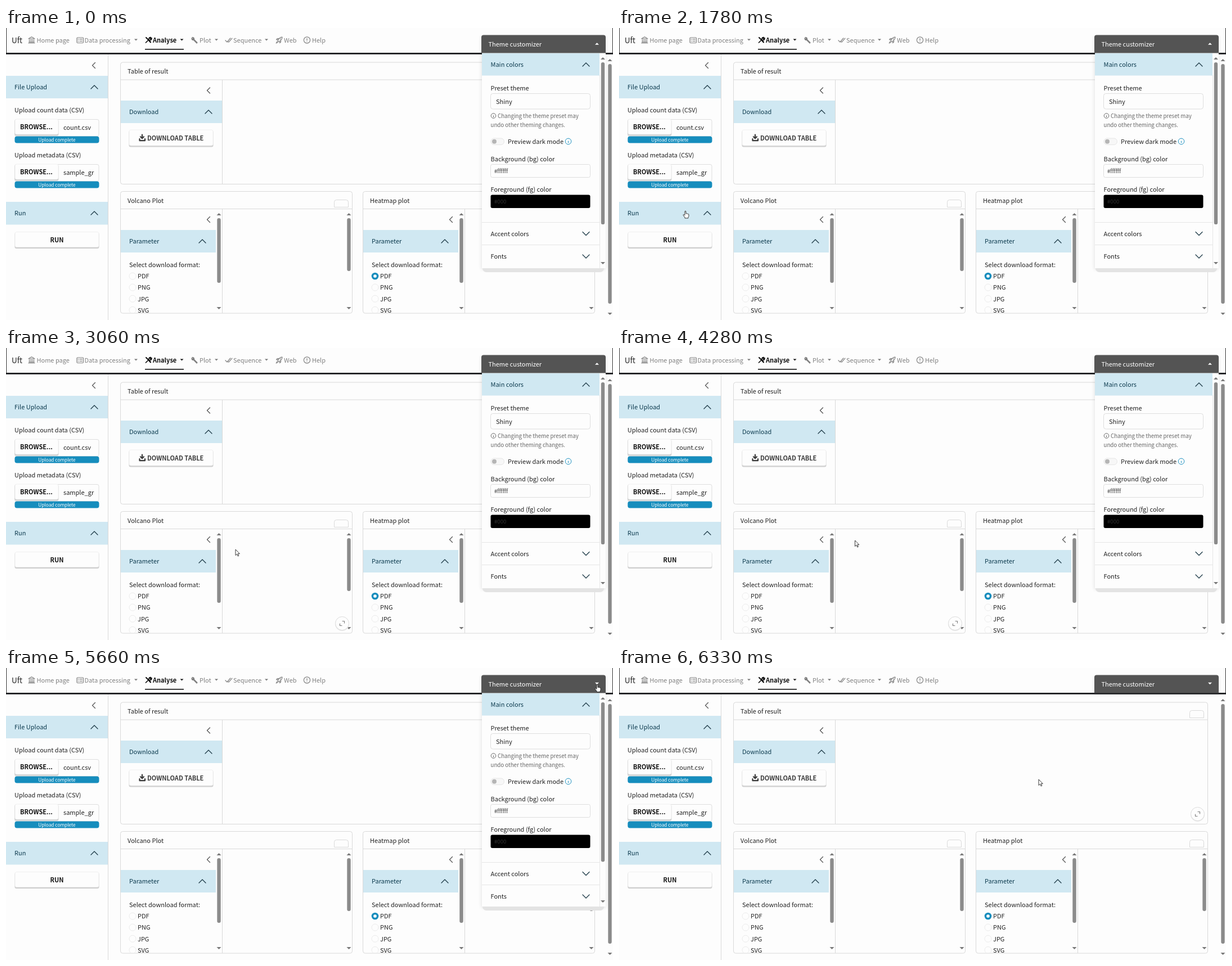
These frames come from a looping animation (1079 by 519 pixels, 8 s). An HTML page:

```html
<!DOCTYPE html>
<html lang="en">
<head>
<meta charset="utf-8">
<title>Analysis dashboard</title>
<style>
html, body { margin: 0; width: 100%; height: 100%; overflow: hidden; background: #fdfdfd; }
svg { display: block; position: absolute; left: 0; top: 0; }
text { font: 11px "Noto Sans CJK JP", "Noto Sans CJK SC", "Noto Sans CJK", "Noto Sans", sans-serif; fill: #222; white-space: pre; }
.bold { font-weight: 700; }
.nav { fill: #808080; }
.dark { fill: #111; }
.title { fill: #0c3a4e; }
.white { fill: #fff; }
.note { font-size: 9.7px; fill: #666; }
.code { font-size: 9.6px; fill: #333; font-variant-ligatures: none; }
.tiny { font-size: 8.3px; fill: #fff; text-anchor: middle; }
.mid { text-anchor: middle; }
.line { fill: none; stroke: #d9d9d9; }
.box { fill: #fdfdfd; stroke: #dedede; }
.band { fill: #d0e8f2; }
.chev { fill: none; stroke: #1d3a47; stroke-width: 1.3; stroke-linecap: round; stroke-linejoin: round; }
.grey { stroke: #555; }
.thumb { fill: #8b8b8b; }
.icon { fill: none; stroke: #808080; stroke-width: 1.2; stroke-linecap: round; stroke-linejoin: round; }
.cursor { fill: #fff; stroke: #222; stroke-width: .9; stroke-linejoin: round; }
</style>
</head>
<body>
<svg id="stage" width="1079" height="519" viewBox="0 0 1079 519"></svg>
<script>
const LOOP = 8000;
const FULL = 383; // open height of the theme panel body
const TOP = 44;

// ---- drawing helpers ----
const text = (x, y, s, cls = '') => `<text x="${x}" y="${y}" class="${cls}">${s}</text>`;
const rect = (x, y, w, h, attrs = '') => `<rect x="${x}" y="${y}" width="${w}" height="${h}" ${attrs}/>`;
const path = (d, cls, attrs = '') => `<path d="${d}" class="${cls}" ${attrs}/>`;
const circle = (x, y, r, attrs) => `<circle cx="${x}" cy="${y}" r="${r}" ${attrs}/>`;
const group = (id, body, attrs = '') => `<g id="${id}" ${attrs}>${body}</g>`;
const place = (x, y, body) => `<g transform="translate(${x} ${y})">${body}</g>`;
const caret = (x, y, dir, fill, s = 3) => path(`M${x - s} ${y - dir * s / 2}h${2 * s}l${-s} ${dir * s}z`, '', `fill="${fill}"`);
const chevron = (x, y, dir) => path(`M${x - 6} ${y - dir * 3}l6 ${dir * 6}l6 ${-dir * 6}`, 'chev');
const back = (x, y) => path(`M${x + 2.5} ${y - 5}l-5 5l5 5`, 'chev grey');
const band = (x, y, w, label, h = 40) => rect(x, y, w, h, 'class="band"')
  + text(x + 15, y + 24, label, 'title') + chevron(x + w - 24, y + 20, -1);
const scroll = (x, top, bottom, len) => caret(x, top, -1, '#777', 4)
  + rect(x - 3.2, top + 7, 6.4, len, 'rx="3.2" class="thumb"') + caret(x, bottom, 1, '#777', 4);
const button = (x, y, w, h, id = '') => rect(x - .5, y + 1, w + 1, h + 1.5, 'rx="3" fill="#cfcfcf"')
  + rect(x, y, w, h, `rx="3" fill="#fdfdfd" stroke="#eee" stroke-width=".8" ${id}`);
const info = (x, y, r, color) => circle(x, y, r, `fill="none" stroke="${color}"`)
  + path(`M${x} ${y - .6}v3M${x} ${y - 2.6}v.4`, '', `stroke="${color}" stroke-width="1.1"`);

const upload = (y, label, file) => text(15, y + 4, label)
  + rect(15.5, y + 16.5, 149.5, 30, 'rx="3" class="box"')
  + button(16, y + 16, 77, 27) + text(25, y + 34, 'BROWSE...', 'bold dark')
  + text(102, y + 35, file) + rect(15.5, y + 46.5, 150, 12, 'rx="4" fill="#168dbd"')
  + text(90.5, y + 55.5, 'Upload complete', 'tiny');

const tab = (x, y) => path(`M${x} ${y + 13}v-9q0-4 4-4h17q4 0 4 4v9z`, 'line');
const card = (x, y, w, h, label) => rect(x, y, w, h, 'rx="4" class="line"')
  + path(`M${x} ${y + 31}h${w}M${x + 181} ${y + 31}v${h - 31}`, 'line') + text(x + 12.5, y + 20, label);

const radio = (x, y, on) => on
  ? circle(x, y, 6.3, 'fill="#168dbd"') + circle(x, y, 2.8, 'fill="#fff"')
  : circle(x, y, 6, 'fill="none" stroke="#ececec"');

const plotCard = (x, label, checked) => place(x, 0,
  card(.5, 290.5, 412, 216.5, label) + tab(380.5, 305.5)
  + back(157, 340.5) + band(1, 359, 169, 'Parameter')
  + scroll(175.5, 331, 498, 115) + scroll(406.5, 331, 498, 94)
  + text(16, 424.5, 'Select download format:')
  + '<g clip-path="url(#cardClip)">' + ['PDF', 'PNG', 'JPG', 'SVG'].map((s, i) =>
    radio(22, 441 + 20.1 * i, checked === s) + text(31, 445.3 + 20.1 * i, s)).join('') + '</g>');

const expand = (id, x, y) => group(id, circle(x, y + 1, 12.5, 'fill="#e9e9e9"')
  + circle(x, y, 12, 'fill="#fdfdfd" stroke="#dcdcdc"')
  + path(`M${x + .5} ${y - 4}h3.5v3.5M${x - .5} ${y + 4}h-3.5v-3.5`, 'icon'));

// ---- navigation bar ----
const icons =
  place(39.5, 15, path('M.5 4L6 .8L11.5 4zM2 5.5v4.500M4.700 5.500v4.500M7.300 5.500v4.500M10 5.500v4.500M.500 12h11M1.200 10.300h9.600', 'icon'))
  + place(125.5, 16.5, rect(.5, .5, 11.5, 9.5, 'rx="1.200" class="icon"')
    + path('M2.500 3.400h1M5.500 3.400h4.500M2.500 6.800h1M5.500 6.800h4.500', 'icon'))
  + place(247, 15, path('M2 2l8 8M10 10.500l-2-2', 'icon', 'style="stroke:#111;stroke-width:2"')
    + path('M1.500 11L7 5.500M7 5.500q-.5-4 3.500-4l-1.500 2l1 1l2-1.500q0 4-4 3.500', 'icon', 'style="stroke:#111;stroke-width:1.700"'))
  + place(329.5, 15.5, path('M10.500 10.500L5 5q.5-4-3.500-4l2 2l-1.200 1.200L.500 2.500q-.2 3.700 3.500 3.500l5.500 5.500z', 'icon', 'style="fill:#808080"'))
  + place(389.500, 16.500, path('M.500 5.500l3 3l6-7M5.500 8l1 .7l6-7', 'icon'))
  + place(479.500, 15.500, path('M3.500 7.500Q6 1 11.500.700Q11.300 6 5 9zM3.500 5L1 5.500L2.500 3.300L5 3.200M7.200 8.700v2.500L9 9.300V7M2.500 8.500L.700 11.500L3.700 10', 'icon')
    + circle(8.300, 4, .9, 'fill="#808080"'))
  + circle(535, 21.5, 5.6, 'class="icon"') + path('M535 18.500v3.600M535 24.300v.3', 'icon');

const nav = text(10, 27, 'Uft', '" style="font-size:13.5px') + icons
  + [[54.5, 'Home page'], [139.5, 'Data processing'], [344, 'Plot'], [404, 'Sequence'], [494, 'Web'], [544, 'Help']]
    .map(([x, s]) => text(x, 25.5, s, 'nav')).join('')
  + text(261, 25.5, 'Analyse', 'bold dark') + rect(247, 37, 69, 1.6, 'fill="#111"')
  + [231, 374, 463].map(x => caret(x, 21, 1, '#777')).join('') + caret(312.5, 21, 1, '#111')
  + rect(0, 44, 1079, 2.8, 'fill="#1b1c1f"')
  + rect(0, 0, 1, 45, 'fill="#333"') + rect(1078, 0, 1, 45, 'fill="#333"');

// ---- left sidebar and main area ----
const sidebar = path('M181.500 47v472', 'line') + back(156, 66.500)
  + band(0, 85, 181, 'File Upload') + upload(146, 'Upload count data (CSV)', 'count.csv')
  + upload(226, 'Upload metadata (CSV)', 'sample_gr')
  + band(0, 309, 181, 'Run', 40.5) + button(16, 362.500, 149, 27, 'id="run"')
  + text(90.500, 380.500, 'RUN', 'bold dark mid');

const table = card(203.5, 61, 843, 216.5, 'Table of result') + tab(1014.5, 75.5)
  + back(360, 111) + band(204, 129, 180, 'Download') + button(219, 181, 149, 28)
  + path('M242 189.500v6.500M239 193.300l3 3l3-3', 'icon', 'style="stroke:#3a3a3a;stroke-width:2.200"')
  + path('M237.500 197v3.200h9.500V197', 'icon', 'style="stroke:#3a3a3a;stroke-width:2.200"')
  + text(251, 199.500, 'DOWNLOAD TABLE', 'bold" style="fill:#3a3a3a');

// ---- theme panel ----
const panelBody = rect(846, TOP, 220, FULL, 'fill="#fdfdfd"')
  + rect(846, 45, 209, 39.5, 'class="band"') + text(861.5, 69, 'Main colors', 'title') + chevron(1031, 65, -1)
  + text(861.5, 110.5, 'Preset theme') + rect(861.5, 116.5, 177, 27.5, 'rx="4" class="box"') + text(871, 134.500, 'Shiny')
  + info(866.500, 156, 4.3, '#666') + text(874, 159.500, 'Changing the theme preset may', 'note')
  + text(861.500, 175.500, 'undo other theming changes.', 'note')
  + rect(862, 196, 23.500, 11.500, 'rx="5.700" fill="#f7f7f7" stroke="#e6e6e6"') + circle(868, 201.700, 4, 'fill="#b5b5b5"')
  + text(892, 205.500, 'Preview dark mode') + info(999.500, 201.500, 5.300, '#168dbd')
  + text(861.500, 237, 'Background (bg) color') + rect(861.500, 242.500, 177, 23, 'rx="3" class="box"')
  + text(868, 257.500, '#ffffff', 'code')
  + text(861.500, 291, 'Foreground (fg) color') + rect(861.500, 296.500, 177, 23.500, 'rx="3" fill="#000"')
  + text(868, 312, '#000', 'code white')
  + path('M846 345.500h209M846 385.500h209M1055.500 84v343', 'line', 'style="stroke:#e6e6e6"')
  + text(861.500, 369.500, 'Accent colors') + chevron(1031, 365.500, 1)
  + text(861.500, 410, 'Fonts') + chevron(1031, 406, 1)
  + group('bar', caret(1061, 54, -1, '#777', 4) + rect(1057.800, 61, 6.400, 10, 'rx="3.200" class="thumb" id="barThumb"')
    + group('barDown', caret(1061, 0, 1, '#777', 4)));

const panel = rect(845, 16, 221, 30, 'id="glow" fill="#000" opacity=".1" filter="url(#soft)"')
  + rect(847, TOP, 216, 10, 'id="slab" rx="7" fill="#e3e3e3"')
  + group('body', panelBody, 'clip-path="url(#bodyClip)"')
  + path('M845 44.500v-28q0-4 4-4h213q4 0 4 4v28z', '', 'fill="#545454"')
  + text(857.500, 32.500, 'Theme customizer', 'white')
  + group('caretUp', caret(1050.500, 28, -1, '#fff', 3.500)) + group('caretDown', caret(1050.500, 27.500, 1, '#fff', 3.500));

const cursors = group('arrow', path('M0 0V10.500L2.500 8.300L4.200 12L5.800 11.300L4.200 7.700H7.400Z', 'cursor'))
  + group('hand', path('M-1 6.500V.900Q0-.500 1 .900V5Q2.200 4.200 2.800 5.200Q4 4.500 4.500 5.600Q6 5.200 6 6.800V9Q6 10.500 5 11.500V13H-1V11.500L-3.800 7.800Q-4 6.200-2.600 6.600L-1 8Z', 'cursor'));

const stage = document.getElementById('stage');
stage.innerHTML = `<defs>
  <clipPath id="cardClip"><rect x="0" y="322" width="412" height="185"/></clipPath>
  <clipPath id="bodyClip"><rect id="bodyBox" x="845" y="${TOP}" width="222" height="${FULL}"/></clipPath>
  <filter id="soft" x="-20%" y="-20%" width="140%" height="140%"><feGaussianBlur stdDeviation="3"/></filter>
</defs>` + rect(0, 0, 1079, 519, 'fill="#fdfdfd"') + nav + sidebar + table
  + plotCard(203, 'Volcano Plot') + plotCard(634, 'Heatmap plot', 'PDF')
  + scroll(1073.500, 57, 508, 426)
  + panel + expand('expandTable', 1028.500, 259.500) + expand('expandPlot', 597.500, 489.500) + cursors;

// ---- motion ----
const ease = {
  lin: p => p,
  out: p => 1 - (1 - p) ** 2,
  both: p => p * p * (3 - 2 * p),
};
// first change, last change, number of steps, end point, easing, bend point
const start = [640, 2];
const moves = [
  [220, 840, 14, [203, 292], 'out', [420, 215]],
  [980, 1170, 5, [200, 291], 'lin'],
  [1360, 1780, 10, [118, 325], 'both'],
  [1827, 2060, 6, [99, 373], 'out', [150, 390]],
  [2200, 2290, 3, [96, 373], 'lin'],
  [2530, 3060, 11, [408, 358], 'both', [250, 385]],
  [3117, 3290, 4, [421, 347], 'out'],
  [3340, 3380, 2, [420.5, 345], 'lin'],
  [3520, 3570, 2, [420, 343], 'lin'],
  [4280, 4280, 1, [419.5, 342], 'lin'],
  [4520, 5280, 17, [1050, 30], 'both', [780, 215]],
  [5330, 5330, 1, [1051, 29.500], 'lin'],
  [5850, 6330, 11, [746, 198], 'both'],
];

function cursorAt(t) {
  let from = start;
  for (const [t0, t1, steps, to, kind, bend] of moves) {
    if (t < t0) break;
    if (t < t1) {
      const held = Math.floor((t - t0) / (t1 - t0) * (steps - 1) + .001) + 1;
      const p = ease[kind](held / steps), q = 1 - p;
      return from.map((a, i) => bend
        ? q * q * a + 2 * p * q * bend[i] + p * p * to[i]
        : q * a + p * to[i]);
    }
    from = to;
  }
  return from;
}

function panelHeight(t) {
  if (t < 5660) return FULL;
  const tick = 140 / 3;
  const held = Math.floor((t - 5660) / tick + .001) * tick;
  const p = Math.min(1, (held + 13.5) / 242);
  return FULL * (1 + Math.cos(Math.PI * p)) / 2;
}

const el = Object.fromEntries([...stage.querySelectorAll('[id]')].map(e => [e.id, e]));
const show = (id, on) => { el[id].style.display = on ? '' : 'none'; };
const set = (id, name, value) => el[id].setAttribute(name, value);

function render(t) {
  const h = panelHeight(t), bottom = TOP + h;
  const [x, y] = cursorAt(t);
  const over = (l, top, r, b) => x > l && x < r && y > top && y < b;

  const open = h > .5, track = h - 34;
  show('body', open);
  show('slab', open);
  show('caretUp', t < 5660);
  show('caretDown', t >= 5660);
  set('bodyBox', 'height', h);
  set('glow', 'height', h + 30);
  set('slab', 'y', bottom - Math.min(h, 14));
  set('slab', 'height', Math.min(h, 14) + 7);
  set('slab', 'opacity', Math.min(1, .35 + h / FULL * .65));
  show('bar', track > 8);
  set('barThumb', 'height', Math.max(8, track * h / 464));
  set('barDown', 'transform', `translate(0 ${bottom - 9})`);

  const moving = t >= 220;
  const onHead = over(845, 13, 1066, TOP), onPanel = over(845, 13, 1066, bottom);
  const onRun = moving && over(16, 362, 165, 391);
  const hand = onHead || onRun || over(0, 309, 181, 349) || over(204, 359, 373, 399);
  show('arrow', moving && !hand);
  show('hand', moving && hand);
  for (const id of ['arrow', 'hand']) set(id, 'transform', `translate(${x} ${y})`);
  set('run', 'fill', onRun ? '#efefef' : '#fdfdfd');
  show('expandTable', moving && !onPanel && over(204, 61, 1046, 277));
  show('expandPlot', moving && over(204, 290, 615, 507));
}

const t0 = performance.now();
function frame() {
  render((performance.now() - t0) % LOOP);
  requestAnimationFrame(frame);
}
frame();
</script>
</body>
</html>
```
